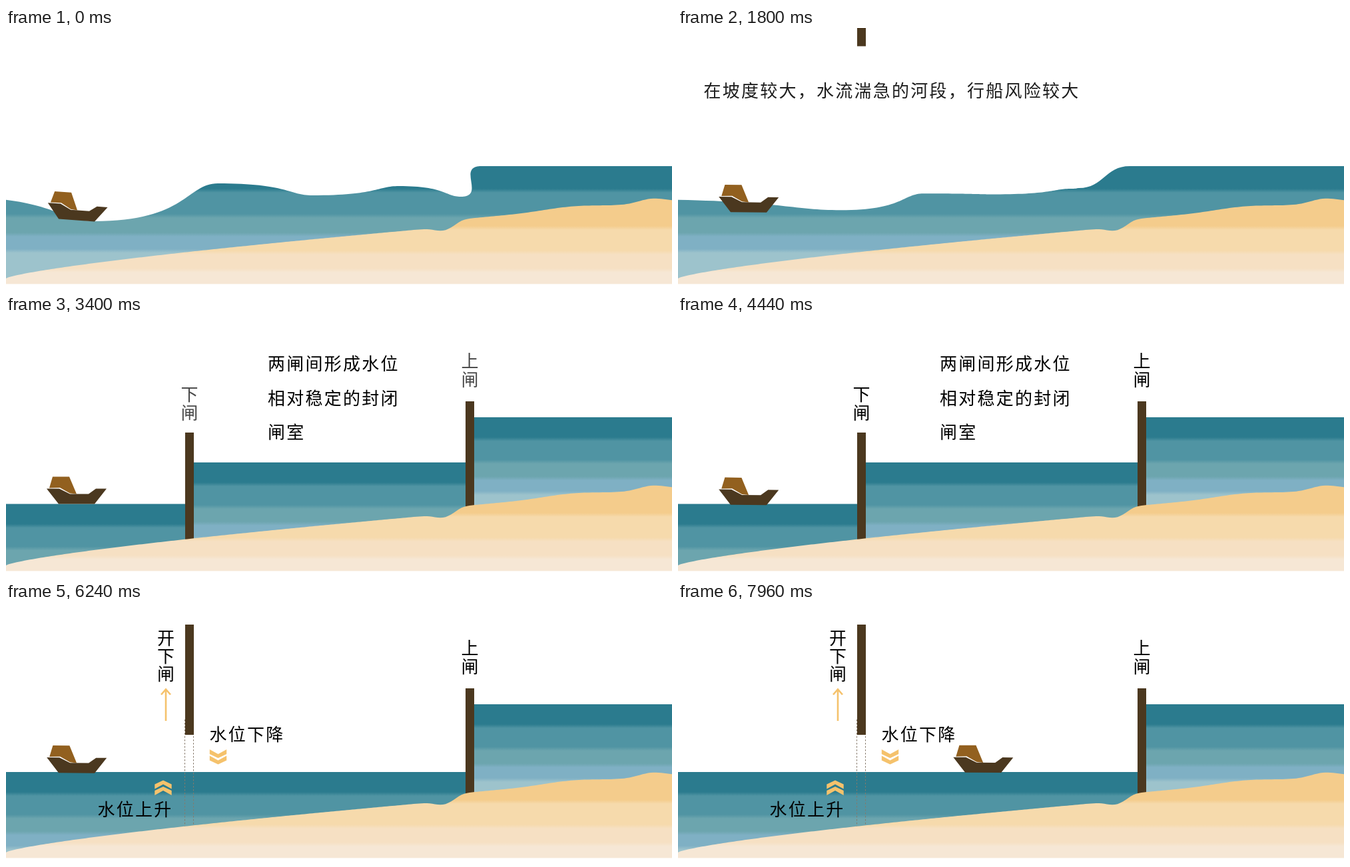
Write an HTML page with a canvas that moves like this. It is 1000 px wide and 390 px high and loops after 8000 ms.

```html
<!DOCTYPE html>
<html lang="zh-CN">
<head>
<meta charset="utf-8">
<style>
html, body { margin: 0; width: 100%; height: 100%; overflow: hidden; background: #fff; }
canvas { display: block; }
</style>
</head>
<body>
<canvas id="stage" width="1000" height="390"></canvas>
<script>
const LOOP = 8000;
const ctx = document.getElementById('stage').getContext('2d');
const FONT = '500 26px "Noto Sans CJK SC", "Noto Sans CJK", sans-serif';
const WOOD = '#4b381f', SAIL = '#92601f', GOLD = '#f5c26c';
const WATER = ['#2b7b8e', '#5094a3', '#6ca5ae', '#7fb0c4', '#9dc3cc'];
const SAND = ['#f4cc8c', '#f6daac', '#f6e0c3', '#f6e7d5'];

// crests and troughs of the wave at three moments
const WAVE_TIMES = [0, 1000, 2400];
const WAVES = [
  [[-90, 254], [132, 291], [318, 234], [460, 252], [590, 238], [683, 254], [714, 208]],
  [[-90, 266], [190, 260], [300, 240], [445, 251], [600, 242], [615, 241], [714, 208]],
  [[-90, 252], [285, 285], [420, 256], [500, 250], [585, 242], [592, 241], [652, 208]]
];

const ramp = (t, a, b) => Math.min(1, Math.max(0, (t - a) / (b - a)));
const mix = (a, b, p) => a + (b - a) * p;
const hump = (x, center, width) => Math.exp(-(((x - center) / width) ** 2));

// mix of three keyed values along WAVE_TIMES
function keyed(t, keys, blend = mix) {
  const i = t < WAVE_TIMES[1] ? 0 : 1;
  return blend(keys[i], keys[i + 1], ramp(t, WAVE_TIMES[i], WAVE_TIMES[i + 1]));
}

// vertical soft bands: colour i gives way to i + 1 at edges[i] below top
function bands(colors, edges, top, length) {
  const g = ctx.createLinearGradient(0, top, 0, top + length);
  edges.forEach((e, i) => {
    g.addColorStop((e - 3) / length, colors[i]);
    g.addColorStop((e + 3) / length, colors[i + 1]);
  });
  return g;
}

const water = (top, stretch = 1) =>
  bands(WATER, [33, 67, 92, 114].map(e => e * stretch), top, 150);

function poly(pts, fill) {
  ctx.beginPath();
  pts.forEach(p => ctx.lineTo(...p));
  ctx.fillStyle = fill;
  ctx.fill();
}

function faded(alpha, draw) {
  if (alpha <= 0) return;
  ctx.save();
  ctx.globalAlpha = alpha;
  draw();
  ctx.restore();
}

function text(str, x, middle) {
  ctx.font = FONT;
  ctx.letterSpacing = '2.25px';
  ctx.fillStyle = '#000';
  ctx.fillText(str, x, middle + 9.8);
}

function column(str, x, middle) {
  [...str].forEach((ch, i) => text(ch, x - 13, middle + i * 27.3));
}

function wave(t) {
  const pts = keyed(t, WAVES, (a, b, p) => a.map((q, i) => q.map((v, k) => mix(v, b[i][k], p))));
  const curl = 38;
  ctx.beginPath();
  ctx.moveTo(...pts[0]);
  for (let i = 1; i < pts.length; i++) {
    const [x0, y0] = pts[i - 1], [x1, y1] = pts[i];
    const last = i === pts.length - 1;
    const knee = mix(x0, x1, 0.75);
    ctx.bezierCurveTo(last ? x0 + curl : knee, y0, last ? x1 - curl : knee, y1, x1, y1);
  }
  ctx.lineTo(1000, 208);
  ctx.lineTo(1000, 380);
  ctx.lineTo(-90, 380);
  ctx.fillStyle = water(208, 1.12);
  ctx.fill();
}

function pool(x0, x1, top) {
  ctx.fillStyle = water(top);
  ctx.fillRect(x0, top, x1 - x0, 380 - top);
}

function bedHeight(x) {
  return 377 - 29 * (x / 180) ** 0.753 - 5 * (1 + Math.tanh((x - 678) / 10))
    + 5 * hump(x, 655, 16) - 5 * hump(x, 850, 60) - 7 * hump(x, 970, 28);
}

function bed() {
  const pts = [[1000, 385.5], [0, 385.5]];
  for (let x = 0; x <= 1000; x += 4) pts.push([x, bedHeight(x)]);
  poly(pts, bands(SAND, [45, 82, 109], 256, 130));
}

function gate(x, top) {
  ctx.fillStyle = WOOD;
  ctx.fillRect(x, top, 13, 166);
}

function guides() {
  ctx.strokeStyle = '#85796a';
  ctx.setLineDash([2.5, 2.5]);
  for (const x of [268.5, 281.5]) {
    ctx.beginPath();
    ctx.moveTo(x, 177);
    ctx.lineTo(x, 340);
    ctx.stroke();
  }
}

function boat(x, y, degrees) {
  ctx.save();
  ctx.translate(x, y);
  ctx.rotate(degrees * Math.PI / 180);
  poly([[-36, -41], [-11, -41], [0, -15], [-10, -16], [-25, -24.5], [-41, -24]], SAIL);
  poly([[-45, -23], [-26, -23], [-10, -15], [18, -15], [29, -23], [45, -23], [27, 0], [-27, 0]], WOOD);
  ctx.restore();
}

function arrow() {
  ctx.strokeStyle = GOLD;
  ctx.lineWidth = 2.6;
  ctx.beginPath();
  ctx.moveTo(240, 179);
  ctx.lineTo(240, 132);
  ctx.moveTo(233, 139.5);
  ctx.lineTo(240, 131.5);
  ctx.lineTo(247, 139.5);
  ctx.stroke();
}

// two stacked chevrons; dir 1 points down, -1 up
function chevrons(x, y, dir) {
  const w = 12.7, h = dir * 7;
  for (const a of [y, y + dir * 9.5]) {
    poly([[x - w, a], [x, a + h], [x + w, a], [x + w, a + h], [x, a + 2 * h - dir], [x - w, a + h]], GOLD);
  }
}

function render(t) {
  ctx.clearRect(0, 0, 1000, 390);
  const locks = ramp(t, 1840, 2520);
  const raised = 345 * (1 - ramp(t, 1730, 2562));
  const lift = 143 * ramp(t, 5480, 6000);
  const level = ramp(t, 5700, 6220);
  const low = mix(284.5, 256, level);
  const opened = ramp(t, 5440, 5660);
  const flow = ramp(t, 5720, 6000);

  faded(1 - locks, () => wave(t));
  faded(locks, () => {
    pool(0, 275, low);
    pool(275, 697, mix(222, 256, level));
    pool(697, 1000, 154);
  });
  faded(opened, guides);
  gate(269, 177 - raised - lift);
  gate(690, 130 - raised);
  bed();

  // the boat rides the wave, then bobs on the lower pool
  const swing = Math.cos((t - 2400) / 1000 * Math.PI);
  const afloat = t > 2400;
  boat(106 + 0.2095 * Math.max(0, t - 6280),
    afloat ? low + 0.8 + 0.7 * swing : keyed(t, [289.5, 266, 286]),
    afloat ? 0.3 + 0.3 * swing : keyed(t, [4.3, 0.6, 0.6]));

  faded(ramp(t, 200, 720) - ramp(t, 1760, 2120), () =>
    text('在坡度较大，水流湍急的河段，行船风险较大', 38.5, 94));
  faded(ramp(t, 2680, 3240) - ramp(t, 4480, 4960), () =>
    ['两闸间形成水位', '相对稳定的封闭', '闸室'].forEach((s, i) => text(s, 393, 73.5 + i * 51.3)));

  const labels = ramp(t, 3000, 3560);
  faded(labels, () => column('上闸', 696.5, 69.5));
  faded(labels - opened, () => column('下闸', 275.5, 119.5));
  faded(opened, () => {
    column('开下闸', 240, 54);
    arrow();
  });
  faded(flow, () => {
    text('水位下降', 305.5, 199);
    text('水位上升', 137.5, 312);
    chevrons(318.5, 222, 1);
    chevrons(236, 291, -1);
  });
}

function tick() {
  render(performance.now() % LOOP);
  requestAnimationFrame(tick);
}
tick();
</script>
</body>
</html>
```
